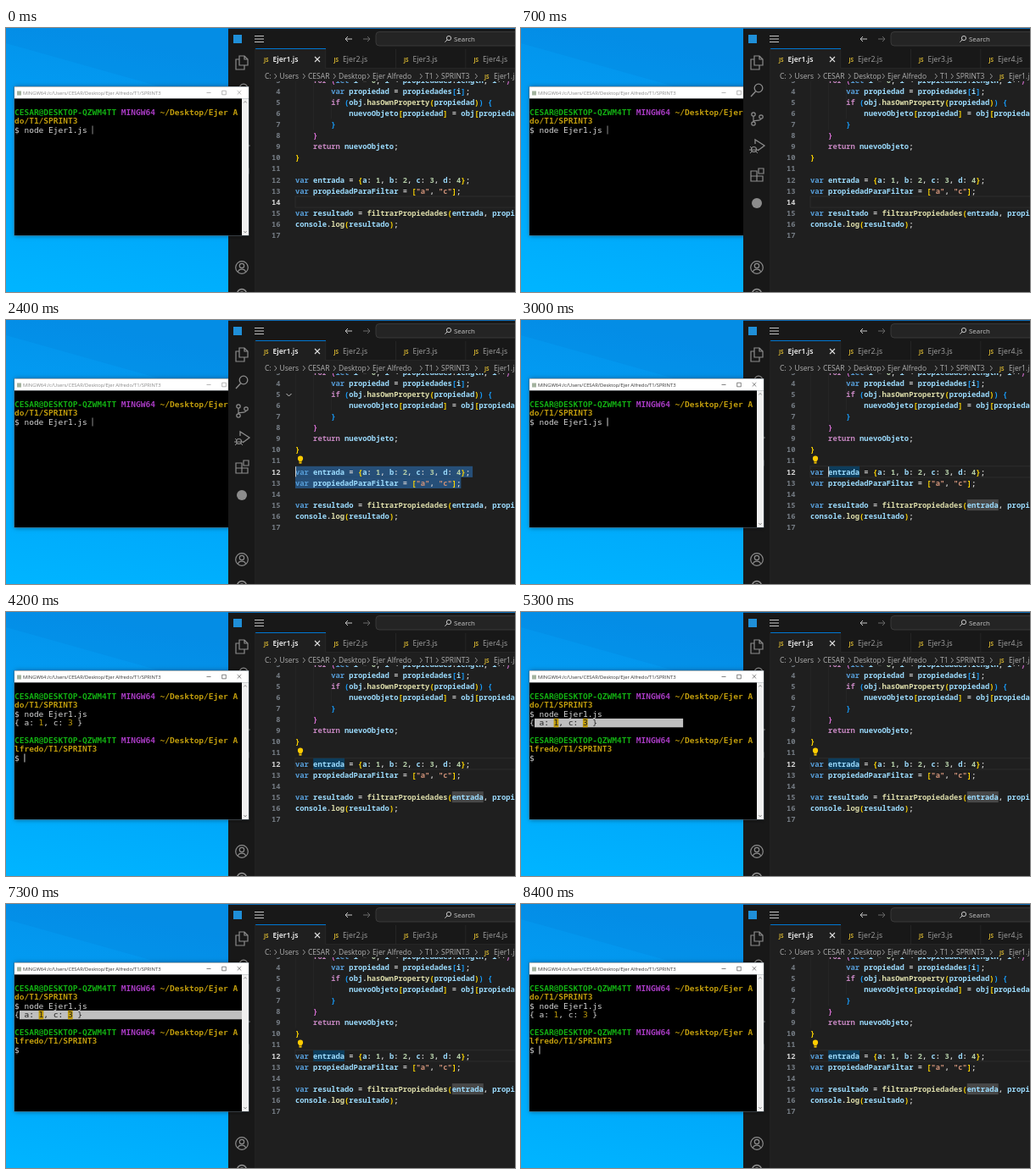
Recreate the animation shown at these times as an HTML page with a canvas. Size 600 by 312 pixels, loop 8.5 s.

```html
<!DOCTYPE html>
<html lang="es">
<head>
<meta charset="utf-8">
<style>
  html, body { margin: 0; width: 100%; height: 100%; overflow: hidden; background: #00a4f8; }
  canvas { display: block; }
</style>
</head>
<body>
<canvas id="stage" width="600" height="312"></canvas>
<script>
const ctx = document.getElementById('stage').getContext('2d');
const LOOP = 8500;
const UI = '"Open Sans", sans-serif';
const CODE_FONT = '600 8.8px "Noto Sans Mono", monospace';
const TERM_FONT = '9.5px "DejaVu Sans Mono", monospace';
const CODE = { x: 341, char: 5.28, row: 13.08, first: 3, y: 61.6 };
const TERM = { x: 10, char: 5.72, row: 10.4, y: 99.7 };
const GREEN = '#12b012', PURPLE = '#a93bc4', GOLD = '#c09c0c', WHITE = '#d4d4d4';

// Moments of the recorded actions, in ms
const AT = {
  editorFront: 100, line13: 900, dragStart: 1500, dragEnd: 2000, bulb: 2200,
  word: 2700, terminalFront: 2900, output: 3600,
  selectStart: 4900, selectEnd: 5500, deselect: 7400
};

const SOURCE = `    for (let i = 0; i < propiedades.length; i++) {
        var propiedad = propiedades[i];
        if (obj.hasOwnProperty(propiedad)) {
            nuevoObjeto[propiedad] = obj[propiedad];
        }
    }
    return nuevoObjeto;
}

var entrada = {a: 1, b: 2, c: 3, d: 4};
var propiedadParaFiltar = ["a", "c"];

var resultado = filtrarPropiedades(entrada, propiedadParaFiltar);
console.log(resultado);
`.split('\n');

const BRACKETS = ['#ffd700', '#da70d6', '#179fff'];
let depth = 1;

function tokenColor(token, rest) {
  if ('([{'.includes(token)) return BRACKETS[depth++ % 3];
  if (')]}'.includes(token)) return BRACKETS[--depth % 3];
  if (/^(var|let)$/.test(token)) return '#569cd6';
  if (/^(for|if|return)$/.test(token)) return '#c586c0';
  if (token[0] === '"') return '#ce9178';
  if (/^\d/.test(token)) return '#b5cea8';
  if (/^\w/.test(token)) return rest[0] === '(' ? '#dcdcaa' : '#9cdcfe';
  return '#d4d4d4';
}

const codeLines = SOURCE.map(line =>
  [...line.matchAll(/"\w+"|\w+|[^\s\w]/g)].map(match => ({
    text: match[0],
    col: match.index,
    color: tokenColor(match[0], line.slice(match.index + match[0].length))
  })));

function rect(x, y, w, h, color) {
  ctx.fillStyle = color;
  ctx.fillRect(x, y, w, h);
}

function text(value, x, y, font, color, align = 'left') {
  ctx.font = font;
  ctx.fillStyle = color;
  ctx.textAlign = align;
  ctx.fillText(value, x, y);
}

function line(path, color, width = 1) {
  ctx.strokeStyle = color;
  ctx.lineWidth = width;
  ctx.stroke(new Path2D(path));
}

function disc(x, y, r, color) {
  ctx.fillStyle = color;
  ctx.beginPath();
  ctx.arc(x, y, r, 0, 7);
  ctx.fill();
}

function ring(x, y, r, color, width = 1) {
  ctx.strokeStyle = color;
  ctx.lineWidth = width;
  ctx.beginPath();
  ctx.arc(x, y, r, 0, 7);
  ctx.stroke();
}

const progress = (t, from, to) => Math.min(1, Math.max(0, (t - from) / (to - from)));
const codeX = col => CODE.x + col * CODE.char;
const codeY = number => CODE.y + (number - CODE.first) * CODE.row;

function codeBox(number, col, length, color) {
  rect(codeX(col), codeY(number) - 6.5, length * CODE.char, CODE.row, color);
}

function drawDesktop() {
  const sky = ctx.createLinearGradient(100, 0, 40, 312);
  sky.addColorStop(0, '#0492ea');
  sky.addColorStop(0.5, '#00a2f8');
  sky.addColorStop(1, '#00b4ff');
  rect(0, 0, 600, 312, sky);
  ctx.fillStyle = '#0878cc30';
  ctx.fill(new Path2D('M0 18 L262 92 V0 H0 Z'));
}

function drawActivityBar() {
  const gray = '#8c8c8c';
  rect(262, 24, 32, 288, '#181818');
  rect(293.5, 24, 0.7, 288, '#2b2b2b');
  line('M275 33 H281 L285 37 V44 H275 Z M281 33 V37 H285 M275 37 H271 V49 H281 V44', gray, 1.2);
  ring(280, 71, 4.8, gray, 1.3);
  line('M276.5 75 L271 81', gray, 1.4);
  for (const [x, y] of [[274, 102], [274, 113], [283, 105]]) ring(x, y, 2.2, gray, 1.2);
  line('M274 104 V111 M283 107 C283 110 277 109 274 110', gray, 1.2);
  line('M276 137 V132 L287 139 L279 145', gray, 1.3);
  ring(274.5, 143.5, 3, gray, 1.2);
  line('M270 140 L272 142 M269 144 H280 M270 148 L272 146 M279 148 L277 146', gray, 1);
  line('M271 169 H278 V181 H271 Z M271 175 H285 V181 H278 M280 166 H286 V172 H280 Z', gray, 1.2);
  disc(278, 207, 6, gray);
  ring(278, 283, 7.3, gray, 1.2);
  ring(278, 281, 2.7, gray, 1.2);
  line('M273.5 288.5 C274 284 282 284 282.5 288.5', gray, 1.2);
  ring(278, 314, 2.2, gray, 1.1);
  ring(278, 314, 5.4, gray, 1.6);
}

function drawHeader() {
  rect(262, 0, 338, 25, '#181818');
  rect(262, 0, 338, 1, '#0c6bb5');
  rect(268, 8, 10, 10, '#1f8fd8');
  line('M293 9.5 H304 M293 13 H304 M293 16.5 H304', '#c5c5c5', 1.1);
  line('M408 13 H400 M403 10 L400 13 L403 16', '#c5c5c5', 1);
  line('M421 13 H429 M426 10 L429 13 L426 16', '#686868', 1);
  ctx.fillStyle = '#242424';
  ctx.strokeStyle = '#414141';
  ctx.lineWidth = 0.8;
  ctx.beginPath();
  ctx.roundRect(436, 4.5, 180, 16.5, 4);
  ctx.fill();
  ctx.stroke();
  ring(522, 12, 2.6, '#c5c5c5', 1);
  line('M520.2 13.8 L517.4 16.7', '#c5c5c5', 1);
  text('Search', 528, 16, `500 7.9px ${UI}`, '#c8c8c8');

  rect(294, 24, 306, 24, '#181818');
  rect(294, 47.3, 306, 0.7, '#2b2b2b');
  rect(294, 24, 83, 24, '#1f1f1f');
  rect(294, 24, 83, 1, '#0078d4');
  for (let i = 0; i < 4; i++) {
    const x = 294 + i * 82.5;
    text('JS', x + 10, 40, `bold 6.4px ${UI}`, '#d0b030');
    text(`Ejer${i + 1}.js`, x + 20.5, 40, `${i ? 500 : 600} 8.7px ${UI}`, i ? '#a2a2a2' : '#ffffff');
    rect(x + 82.5, 25, 0.7, 23, '#2b2b2b');
  }
  line('M364 34 L370 40 M370 34 L364 40', '#e0e0e0', 1.1);

  rect(294, 48, 306, 15, '#1f1f1f');
  const crumbs = [['C:', 305], ['Users', 322.5], ['CESAR', 356], ['Desktop', 392],
    ['Ejer Alfredo', 432], ['T1', 494], ['SPRINT3', 513], ['Ejer1.js', 575]];
  crumbs.forEach(([label, x], i) => {
    text(label, x, 60, `500 8.5px ${UI}`, '#b0b0b0');
    const arrow = i === 7 ? 553 : x - 6;
    if (i) line(`M${arrow} 54 L${arrow + 2.5} 57 L${arrow} 60`, '#a0a0a0', 0.9);
  });
  text('JS', 564, 60, `bold 6.4px ${UI}`, '#d0b030');
}

function drawSelection(t) {
  if (t < AT.dragStart || t >= AT.word) return;
  const drag = progress(t, AT.dragStart, AT.dragEnd);
  const startCol = Math.round(37 * (1 - drag));
  codeBox(13, startCol, 37 - startCol, '#264f78');
  if (drag === 1) codeBox(12, 0, 39.6, '#264f78');
}

function drawEditor(t) {
  rect(262, 0, 338, 312, '#1f1f1f');
  const current = t < AT.line13 ? 14 : t < AT.dragEnd ? 13 : 12;
  const selecting = t >= AT.dragStart && t < AT.word;

  if (!selecting) {
    ctx.strokeStyle = '#2c2c2c';
    ctx.lineWidth = 1;
    ctx.strokeRect(CODE.x, codeY(current) - 6.5, 270, CODE.row);
  }
  drawSelection(t);
  if (t >= AT.word) {
    codeBox(12, 4, 7, '#0d3d5c');
    codeBox(15, 35, 7, '#474747');
  }
  for (const [col, last] of [[0, 9], [4, 7], [8, 6]]) {
    const x = codeX(col) + 0.3;
    line(`M${x} 63 V${codeY(last) + 6.5}`, '#2c2c2c', 0.6);
  }
  codeLines.forEach((tokens, i) => {
    const number = CODE.first + i;
    const y = codeY(number) + 3.2;
    text(number, 323.5, y, CODE_FONT, number === current ? '#d4d4d4' : '#747b83', 'right');
    for (const token of tokens) text(token.text, codeX(token.col), y, CODE_FONT, token.color);
  });

  const caretCol = t < AT.line13 ? 0 : t < AT.dragStart ? 37
    : t < AT.word ? Math.round(37 * (1 - progress(t, AT.dragStart, AT.dragEnd))) : 4;
  if (t >= AT.line13 && t < AT.output) {
    rect(codeX(caretCol), codeY(current) - 6, 1, 12, '#cccccc');
  }
  if (t >= AT.bulb) {
    disc(347, 163.7, 3.1, '#ffcc00');
    rect(345.5, 166, 3, 3.6, '#ffcc00');
    rect(345.5, 167.5, 3, 0.6, '#1f1f1f');
  }
  if (t >= AT.dragEnd && t < AT.word) line('M330.5 87 L333.5 90 L336.5 87', '#c5c5c5', 1);
  drawHeader();
  drawActivityBar();
}

function termText(value, col, row, color, weight = '') {
  const y = TERM.y + row * TERM.row + 3.3;
  text(value, TERM.x + col * TERM.char, y, `${weight} ${TERM_FONT}`, color);
}

function drawPrompt(row, rest) {
  termText('CESAR@DESKTOP-QZWM4TT', 0, row, GREEN, 'bold');
  termText('MINGW64', 22, row, PURPLE, 'bold');
  termText('~/Desktop/Ejer A', 30, row, GOLD, 'bold');
  termText(rest, 0, row + 1, GOLD, 'bold');
  termText('$', 0, row + 2, WHITE);
}

function drawOutput(t) {
  const selected = t >= AT.selectStart && t < AT.deselect;
  const edge = selected ? 16 + 262 * progress(t, AT.selectStart, AT.selectEnd) : 0;
  const top = TERM.y + 3 * TERM.row - 5;
  if (selected) rect(16, top, edge - 16, TERM.row, '#bfbfbf');
  [...'{ a: 1, c: 3 }'].forEach((char, col) => {
    const x = TERM.x + col * TERM.char;
    const inverted = col > 0 && x + TERM.char / 2 < edge;
    const isNumber = /\d/.test(char);
    if (inverted && isNumber) rect(x, top, TERM.char, TERM.row, GOLD);
    termText(char, col, 3, inverted ? '#202020' : isNumber ? GOLD : WHITE);
  });
}

function drawTerminal(t) {
  const active = t >= AT.terminalFront;
  const ink = active ? '#333333' : '#888888';
  ctx.shadowColor = '#00000066';
  ctx.shadowBlur = 5;
  rect(9.5, 69, 277, 176.5, '#5c6b75');
  ctx.shadowBlur = 0;
  rect(10, 69.5, 276, 14, '#ffffff');
  rect(10, 83.5, 268, 161.5, '#000000');
  rect(278, 83.5, 8, 161.5, '#f0f0f0');
  line('M280.3 88.5 L282 86.5 L283.7 88.5 M280.3 240 L282 242 L283.7 240', '#808080', 0.8);
  rect(13, 74.5, 5, 5, '#a3b39f');
  text('MINGW64:/c/Users/CESAR/Desktop/Ejer Alfredo/T1/SPRINT3', 20, 78.8, `5.8px ${UI}`, ink);
  line('M236.5 76.5 H241.5 M254.7 74.2 H259.3 V78.8 H254.7 Z M272.7 74 L277.3 78.6 M277.3 74 L272.7 78.6', ink, 0.6);

  drawPrompt(0, 'do/T1/SPRINT3');
  termText('node Ejer1.js', 2, 2, WHITE);
  const done = t >= AT.output;
  if (done) {
    drawOutput(t);
    drawPrompt(5, 'lfredo/T1/SPRINT3');
  }
  if (t < AT.selectStart || t >= AT.deselect) {
    const x = TERM.x + (done ? 2 : 16) * TERM.char;
    const y = TERM.y + (done ? 7 : 2) * TERM.row - 5;
    rect(x, y, 1, 10, active ? '#cfcfcf' : '#8a8a8a');
  }
}

function draw(now) {
  const t = now % LOOP;
  drawDesktop();
  const editorInFront = t >= AT.editorFront && t < AT.terminalFront;
  const windows = editorInFront ? [drawTerminal, drawEditor] : [drawEditor, drawTerminal];
  for (const drawWindow of windows) drawWindow(t);
  requestAnimationFrame(draw);
}

requestAnimationFrame(draw);
</script>
</body>
</html>
```
